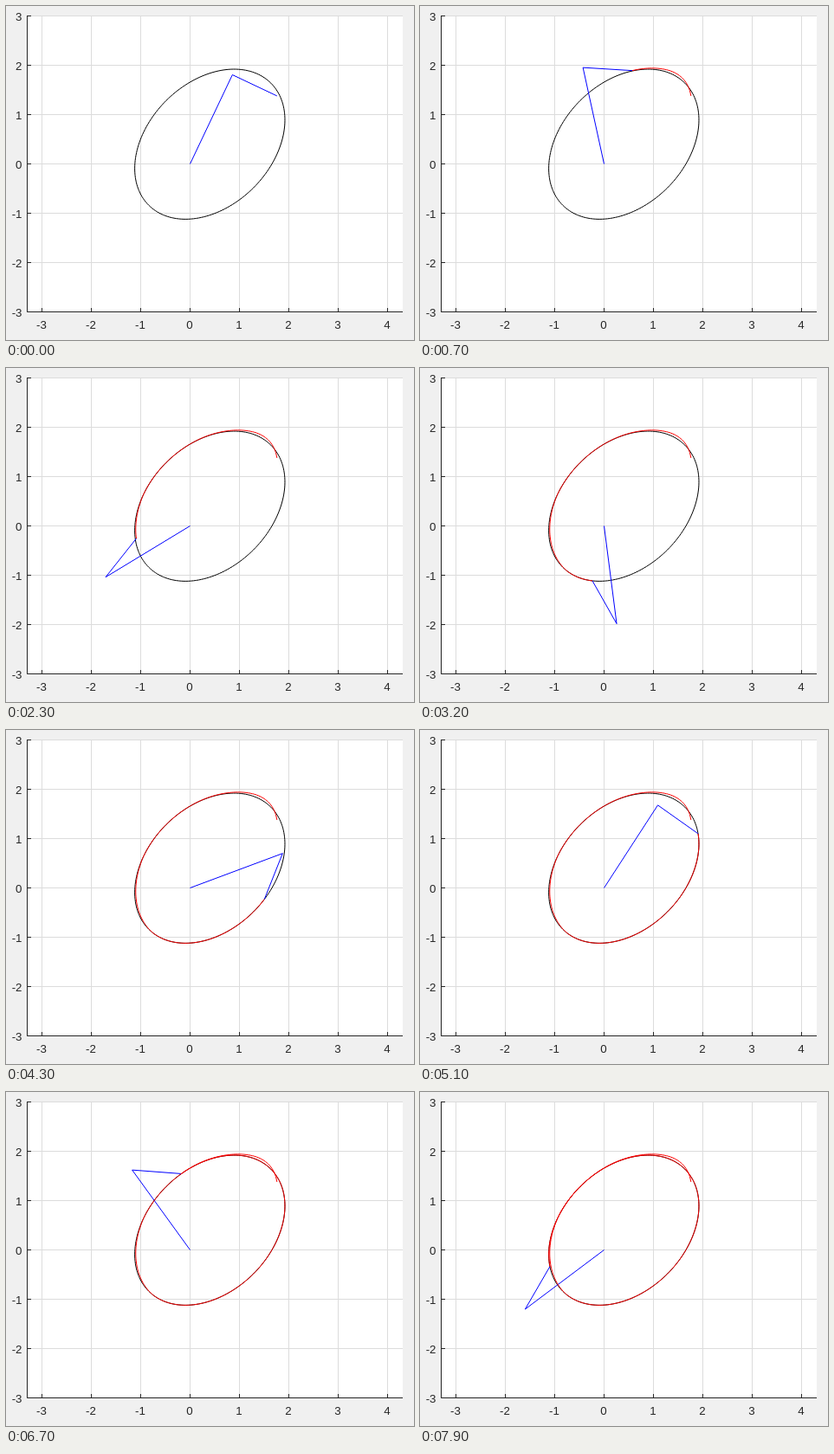
An HTML page that plays this animation: 471x386 px, repeating every 8000 ms.

```html
<!DOCTYPE html>
<html lang="en">
<head>
<meta charset="utf-8">
<title>Two-link arm tracing an ellipse</title>
<style>
  html, body { margin: 0; width: 100%; height: 100%; overflow: hidden; background: #f0f0f0; }
  svg { display: block; }
  path { fill: none; stroke-width: 1; }
  text { font: 13.3px "Liberation Sans", Arial, sans-serif; fill: #262626; }
  #grid { stroke: #dcdcdc; }
  #axes { stroke: #262626; }
  #goal { stroke: #000; }
  #arm { stroke: #00f; }
  #trail { stroke: #f00; }
</style>
</head>
<body>
<svg width="471" height="386" viewBox="0 0 471 386">
  <rect x="25" y="11" width="433" height="343" fill="#fff"/>
  <path id="grid"/>
  <path id="axes"/>
  <g id="labels"></g>
  <path id="goal"/>
  <path id="arm"/>
  <path id="trail"/>
</svg>
<script>
const LOOP = 8000, STEP = 100, SUB = 25;
const UNIT = 57, OX = 212.5, OY = 182.5;
const LEFT = 24.5, RIGHT = 458, TOP = 11, BOTTOM = 353.5;
const CENTER = 0.4, MAJOR = 1.75, MINOR = 1.25;
const UPPER = 2, FORE = 1;
const RAD = Math.PI / 180;

const byId = id => document.getElementById(id);
const px = x => OX + UNIT * x;
const py = y => OY - UNIT * y;
const draw = (id, d) => byId(id).setAttribute("d", d);
const line = pts => pts.length < 2 ? "" :
  "M" + pts.map(([x, y]) => px(x).toFixed(2) + " " + py(y).toFixed(2)).join("L");

// Ellipse tilted by 45 degrees
function ellipse(deg, size = 1) {
  const u = MAJOR * size * Math.cos(deg * RAD);
  const v = MINOR * size * Math.sin(deg * RAD);
  return [CENTER + (u - v) * Math.SQRT1_2, CENTER + (u + v) * Math.SQRT1_2];
}

// Half sine between two limits, zero outside
function hump(x, from, to) {
  return x > from && x < to ? Math.sin(Math.PI * (x - from) / (to - from)) : 0;
}

// Tip position: settles onto the ellipse, then follows it
function tip(t) {
  const deg = 2.2 + 64.85 * t + 2.3 * hump(t, 0.4, 2.4) ** 2;
  const [x, y] = ellipse(deg, 1 - 0.014 * hump(deg, 117, 185));
  return [
    x + 0.158 * (1 + 12 * t) * Math.exp(-10 * t),
    y - 0.292 * (1 - 6.5 * t) * Math.exp(-7 * t)
  ];
}

// Inverse kinematics, elbow on the leading side
function elbow([x, y]) {
  const r = Math.hypot(x, y);
  const bend = Math.acos((r * r + UPPER * UPPER - FORE * FORE) / (2 * UPPER * r));
  const a = Math.atan2(y, x) + bend;
  return [UPPER * Math.cos(a), UPPER * Math.sin(a)];
}

function label(value, x, y, anchor) {
  const el = document.createElementNS("http://www.w3.org/2000/svg", "text");
  el.setAttribute("x", x);
  el.setAttribute("y", y);
  el.setAttribute("text-anchor", anchor);
  el.textContent = value;
  byId("labels").append(el);
}

function buildAxes() {
  let grid = "", axes = `M${LEFT} ${TOP}V${BOTTOM}H${RIGHT}`;
  for (let v = -3; v <= 4; v++) {
    const x = px(v), y = py(v);
    grid += `M${x} ${TOP}V${BOTTOM}`;
    axes += `M${x} ${BOTTOM}v-4.5`;
    label(v, x - 0.5, 373, "middle");
    if (v > 3) continue;
    grid += `M${LEFT} ${y}H${RIGHT}`;
    axes += `M${LEFT} ${y}h4.5`;
    label(v, 18.5, y + 5, "end");
  }
  draw("grid", grid);
  draw("axes", axes);
  draw("goal", line(Array.from({ length: 181 }, (_, i) => ellipse(i * 2))) + "Z");
}

const path = Array.from({ length: LOOP / SUB }, (_, i) => tip(i * SUB / 1000));
let shown = -1;

function render(ms) {
  const step = Math.floor((ms % LOOP) / STEP);
  if (step === shown) return;
  shown = step;
  const end = step * STEP / SUB;
  draw("arm", line([[0, 0], elbow(path[end]), path[end]]));
  draw("trail", line(path.slice(0, end + 1)));
}

buildAxes();
render(0);
const start = performance.now();
function tick() {
  render(performance.now() - start);
  requestAnimationFrame(tick);
}
requestAnimationFrame(tick);
</script>
</body>
</html>
```
